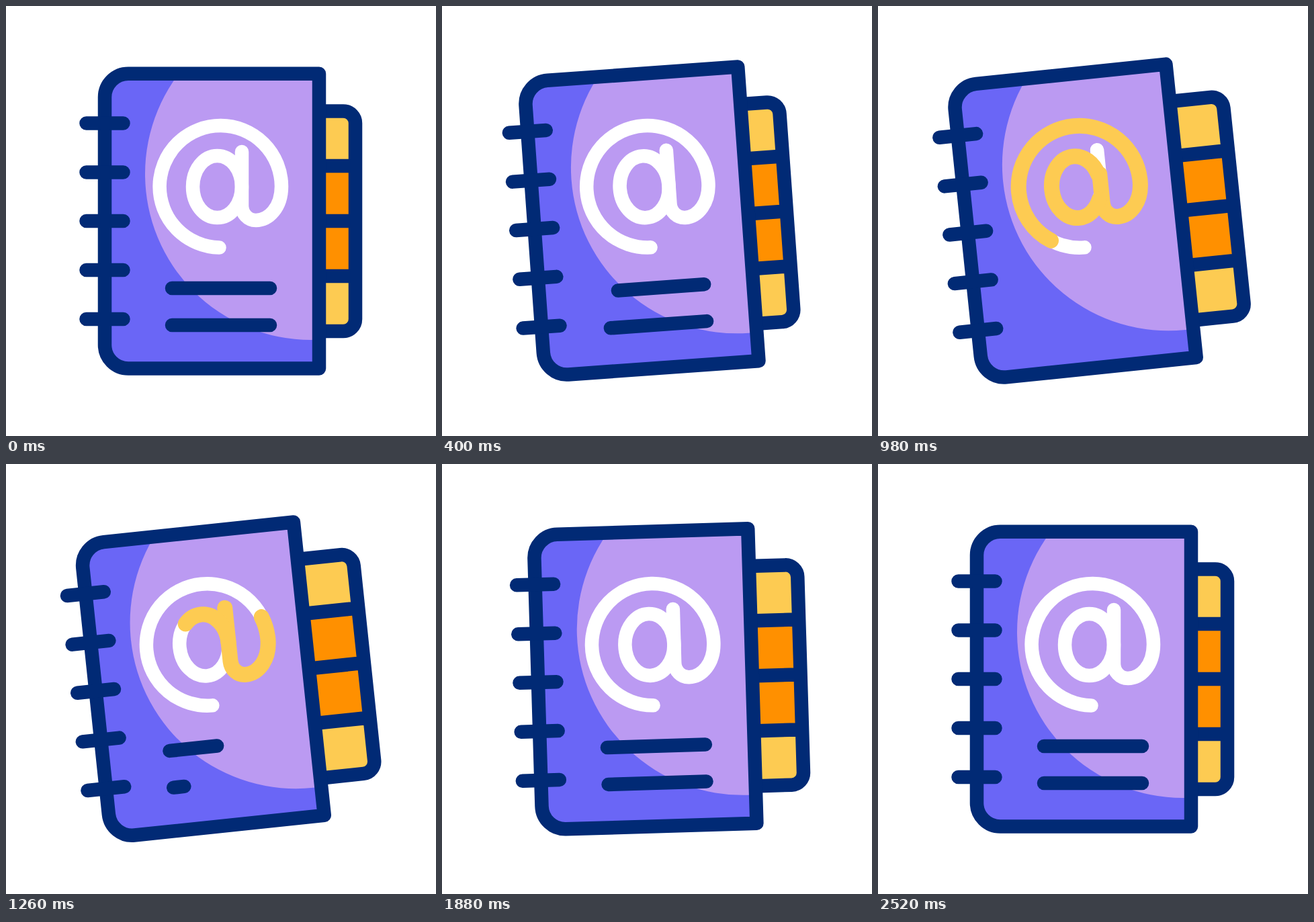
These frames come from a looping animation (640 by 640 pixels, 2700 ms). An HTML page:

```html
<!DOCTYPE html>
<html lang="en">
<head>
<meta charset="utf-8">
<title>Address book</title>
<style>
  html, body { margin: 0; height: 100%; overflow: hidden; background: #fff; }
  svg { display: block; width: 100%; height: 100%; }
  .ink { stroke: #012a75; stroke-width: 20.5; }
  .sign { stroke: #fff; stroke-width: 20.5; }
  .glow { stroke: #fdcb52; stroke-width: 23; }
</style>
</head>
<body>
<svg viewBox="0 0 640 640" fill="none" stroke-linecap="round" stroke-linejoin="round">
  <defs>
    <path id="ring" pathLength="1" d="M317.5 359.5A90.7 90.7 0 1 1 410 268.5C410 300 391 319 372 319C360 319 351 309 351 297V217"/>
    <path id="bowl" pathLength="1" d="M351 269A36.5 46 0 0 1 278 269A36.5 46 0 0 1 351 269"/>
    <path id="cover" d="M182 100.7H466V539.5H182A35 35 0 0 1 147 504.5V135.7A35 35 0 0 1 182 100.7Z"/>
    <clipPath id="inside"><use href="#cover"/></clipPath>
  </defs>
  <g id="book">
    <g id="tabs">
      <path fill="#fdcb52" d="M430 156.5H502A18 18 0 0 1 520 174.5V466A18 18 0 0 1 502 484H430Z"/>
      <path fill="#ff9000" d="M430 238H520V402H430Z"/>
      <path class="ink" d="M430 156.5H502A18 18 0 0 1 520 174.5V466A18 18 0 0 1 502 484H430M430 238H520M430 320H520M430 402H520"/>
    </g>
    <use href="#cover" fill="#6a66f6"/>
    <circle cx="454" cy="250" r="247" fill="#bb9af2" clip-path="url(#inside)"/>
    <use href="#cover" class="ink"/>
    <path class="ink" d="M119.5 174.5h55m-55 73h55m-55 72.5h55m-55 73h55m-55 73h55"/>
    <line class="ink text" y1="420" y2="420"/>
    <line class="ink text" y1="475" y2="475"/>
    <g class="sign"><use href="#ring"/><use href="#bowl"/></g>
    <g class="glow" id="glow"><use href="#ring"/><use href="#bowl"/></g>
  </g>
</svg>
<script>
const LOOP = 2700;
const $ = id => document.getElementById(id);
const lines = document.querySelectorAll('.text');

const ramp = (t, from, to) => Math.min(1, Math.max(0, (t - from) / (to - from)));
const smooth = u => u * u * (3 - 2 * u);
const ease = (t, from, to) => smooth(ramp(t, from, to));

// Bezier easing (.35, 0, 0, 1): brisk start, long settle
function settle(t, from, to) {
  const x = ramp(t, from, to);
  let low = 0, high = 1;
  for (let i = 0; i < 24; i++) {
    const u = (low + high) / 2;
    if (1.05 * u * (1 - u) ** 2 + u ** 3 < x) low = u; else high = u;
  }
  return smooth((low + high) / 2);
}

function drawLine(line, t, eraseAt, writeAt) {
  const writing = t >= writeAt;
  const start = writing ? 0 : ease(t, eraseAt, eraseAt + 440);
  const end = writing ? ease(t, writeAt, writeAt + 440) : 1;
  line.setAttribute('x1', 247 + 146 * start);
  line.setAttribute('x2', 247 + 146 * end);
  line.style.opacity = writing ? +(end > 0) : 1 - ramp(t, eraseAt + 313, eraseAt + 393);
}

function render(t) {
  const angle = -6 * (settle(t, 0, 1200) - settle(t, 1650, 2300));
  const slide = 28.5 * (ease(t, 190, 1210) - ease(t, 1640, 2220));
  $('book').setAttribute('transform', `rotate(${angle} 311 457)`);
  $('tabs').setAttribute('transform', `translate(${slide})`);

  drawLine(lines[0], t, 306, 1045);
  drawLine(lines[1], t, 367, 1170);

  const tail = ease(t, 861, 1531), length = ease(t, 410, 1080) - tail;
  const glow = $('glow').style;
  glow.display = length > 0 ? '' : 'none';
  glow.strokeDasharray = `${length} 3`;
  glow.strokeDashoffset = -tail;
}

function frame() {
  render(performance.now() % LOOP);
  requestAnimationFrame(frame);
}
frame();
</script>
</body>
</html>
```
